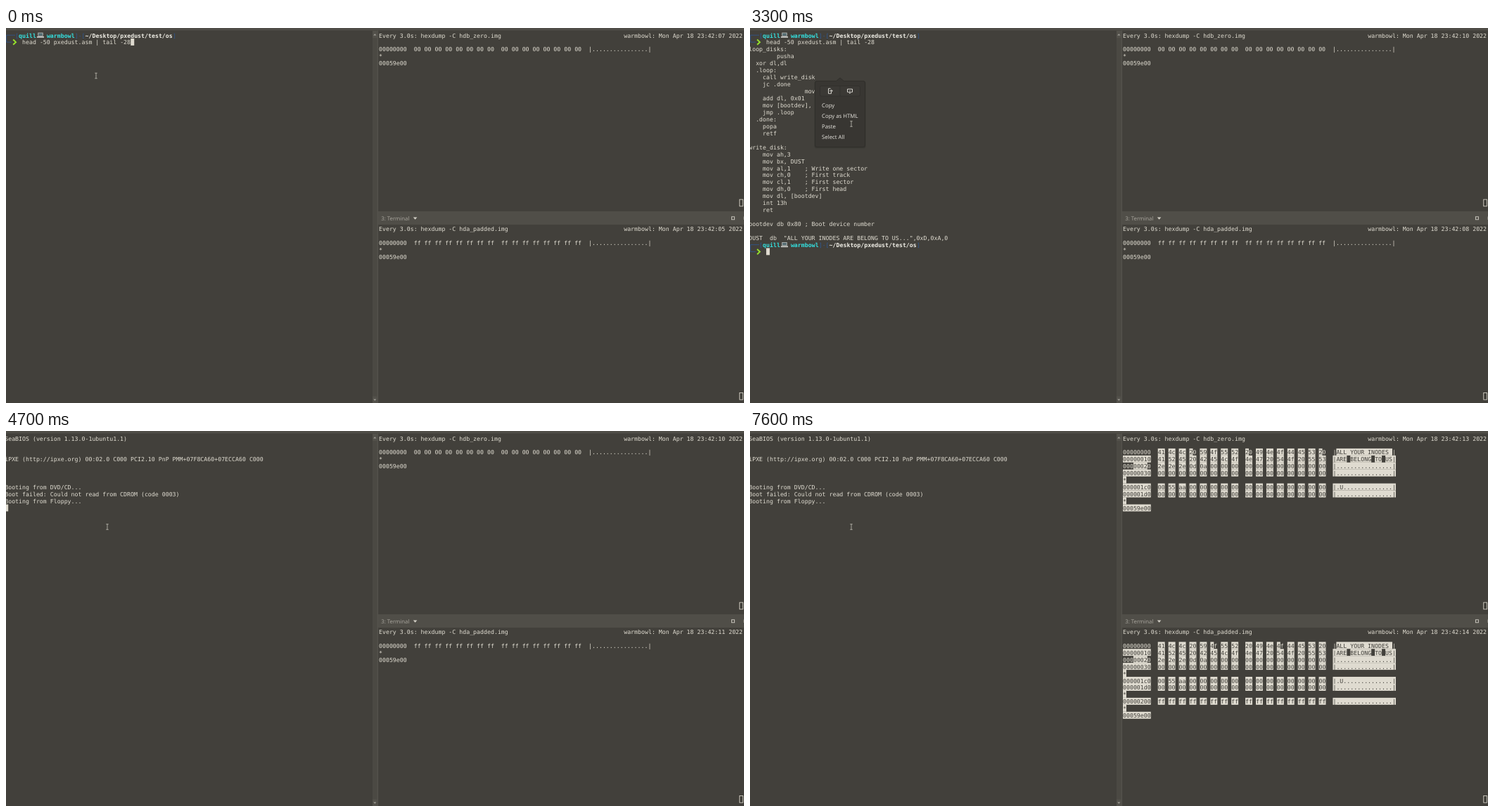
Animation of 1049x534 px, one loop 8 s. Source, as an HTML page:

```html
<!DOCTYPE html>
<html lang="en">
<head>
<meta charset="utf-8">
<title>Terminal session</title>
<style>
  html, body { margin: 0; width: 100%; height: 100%; overflow: hidden; background: #42403b; }
  svg { display: block; width: 100%; height: 100%; }
  text { white-space: pre; text-rendering: geometricPrecision; }
  .mono { font: 8.262px "DejaVu Sans Mono", monospace; fill: #dfdbd0; }
  .bold { font-weight: bold; }
  .ui { font: 7.8px "Open Sans", sans-serif; }
</style>
</head>
<body>
<svg id="stage" viewBox="0 0 1049 534" xmlns="http://www.w3.org/2000/svg"></svg>
<script>
const LOOP = 8000, STEP = 100;
const CELL = 4.974, ROW = 9.948;
const BG = '#42403b', FG = '#dfdbd0', BAR = '#504e48', BLUE = '#2f5793', CYAN = '#34e2e2';
const USER = 'quill', HOST = 'warmbowl';
const LEFT = { x: -1.8, y: 5 }, TOP = { x: 530, y: 5 }, BOTTOM = { x: 530, y: 280.4 };

const LISTING = `loop_disks:
        pusha
  xor dl,dl
  .loop:
    call write_disk
    jc .done
                mov dl, [bootdev]
    add dl, 0x01
    mov [bootdev], dl
    jmp .loop
  .done:
    popa
    retf

write_disk:
    mov ah,3
    mov bx, DUST
    mov al,1    ; Write one sector
    mov ch,0    ; First track
    mov cl,1    ; First sector
    mov dh,0    ; First head
    mov dl, [bootdev]
    int 13h
    ret

bootdev db 0x80 ; Boot device number

DUST  db  "ALL YOUR INODES ARE BELONG TO US...",0xD,0xA,0`.split('\n');

const COMMAND = `       qemu-system-x86_64 \\
>     -fda pxedust.bin \\
>     -boot d \\
>     -hda hda_padded.img \\
>     -hdb hdb_zero.img \\
>     -vga none -nographic`.split('\n');

const WARNINGS = ['pxedust.bin', 'hda_padded.img', 'hdb_zero.img'].flatMap(name => [
  `WARNING: Image format was not specified for '${name}' and probing guessed raw.`,
  '         Automatically detecting the format is dangerous for raw images, write operations on block 0 wil',
  'l be restricted.',
  "         Specify the 'raw' format explicitly to remove the restrictions."
]);

const BIOS = ['SeaBIOS (version 1.13.0-1ubuntu1.1)', '', '',
  'iPXE (http://ipxe.org) 00:02.0 C000 PCI2.10 PnP PMM+07F8CA60+07ECCA60 C000', '', '', '',
  'Booting from DVD/CD...',
  'Boot failed: Could not read from CDROM (code 0003)',
  'Booting from Floppy...'];

const escapeText = s => s.replace(/&/g, '&amp;').replace(/</g, '&lt;').replace(/>/g, '&gt;');
const rect = (x, y, w, h, fill, extra = '') =>
  `<rect x="${x}" y="${y}" width="${w}" height="${h}" fill="${fill}" ${extra}/>`;
const path = (d, stroke, width = 1) =>
  `<path d="${d}" fill="none" stroke="${stroke}" stroke-width="${width}"/>`;
const label = (x, y, s, fill) => `<text class="ui" x="${x}" y="${y}" fill="${fill}">${s}</text>`;

function write(pane, row, col, s, fill = FG, bold = false) {
  if (!s.trim()) return '';
  const x = pane.x + col * CELL, y = pane.y + row * ROW + 8.5;
  return `<text class="mono${bold ? ' bold' : ''}" x="${x}" y="${y}" style="fill:${fill}">${escapeText(s)}</text>`;
}
const writeLines = (pane, row, lines) => lines.map((s, i) => write(pane, row + i, 0, s)).join('');
const block = (pane, row, col, n = 1) =>
  rect(pane.x + col * CELL, pane.y + row * ROW, n * CELL, ROW, FG);
const hollow = (pane, row, col) =>
  rect(pane.x + col * CELL + .4, pane.y + row * ROW + .4, CELL - .3, ROW - .3, 'none', `stroke="${FG}" stroke-width=".8"`);

function prompt(row) {
  const y = LEFT.y + row * ROW, mid = y + 5.2, low = mid + ROW;
  const put = (col, s, fill, bold) => write(LEFT, row, col, s, fill, bold);
  return path(`M13 ${mid}H.7V${low}H8`, BLUE, .8)
    + put(3, '[', BLUE) + put(4, USER, CYAN, true)
    + rect(45.3, y + 1.6, 7.4, 5, '#b9bdbb') + rect(46.2, y + 2.4, 5.6, 3.5, '#536a70')
    + rect(44, y + 7, 10, 1.7, '#d0d2cf')
    + put(12, HOST, CYAN, true) + put(20, ']-[', BLUE)
    + put(23, '~/Desktop/pxedust/test/os', '#f0eee6', true) + put(48, ']', BLUE)
    + path(`M10.2 ${low - 3.6}L14 ${low}L10.2 ${low + 3.6}`, '#97e32c', 1.9);
}

function hexRow(offset, bytes) {
  const hex = bytes.map(b => b.toString(16).padStart(2, '0'));
  const ascii = bytes.map(b => b >= 32 && b < 127 ? String.fromCharCode(b) : '.').join('');
  return `${offset}  ${hex.slice(0, 8).join(' ')}  ${hex.slice(8).join(' ')}  |${ascii}|`;
}
const fill16 = (value, head = []) => Array.from({ length: 16 }, (_, i) => head[i] ?? value);
const codes = s => [...s].map(c => c.charCodeAt(0));
const blankDump = value => [hexRow('00000000', fill16(value)), '*', '00059e00'];
const infectedDump = tail => [
  hexRow('00000000', codes('ALL YOUR INODES ')),
  hexRow('00000010', codes('ARE BELONG TO US')),
  hexRow('00000020', fill16(0, codes('...\r\n'))),
  hexRow('00000030', fill16(0)), '*',
  hexRow('000001c0', fill16(0, [0, 0x55, 0xaa])),
  hexRow('000001d0', fill16(0)), '*', ...tail, '00059e00'];

// Characters that differ from the previous dump are shown in reverse video.
function diffRow(pane, row, now, before) {
  const changed = [...now].map((c, i) => c !== (before[i] ?? ' '));
  let out = '';
  for (let i = 0; i < now.length;) {
    let end = i + 1;
    while (end < now.length && changed[end] === changed[i]) end++;
    if (changed[i]) out += block(pane, row, i, end - i);
    out += write(pane, row, i, now.slice(i, end), changed[i] ? BG : FG);
    i = end;
  }
  return out;
}

function watch(pane, file, second, before, now) {
  return write(pane, 0, 0, `Every 3.0s: hexdump -C ${file}`)
    + write(pane, 0, 70, `${HOST}: Mon Apr 18 23:42:${String(second).padStart(2, '0')} 2022`)
    + now.map((s, i) => diffRow(pane, i + 2, s, before[i] ?? '')).join('')
    + hollow(pane, 24, 103);
}

function rightPanes(t) {
  const zero = blankDump(0), padded = blankDump(255);
  const topDump = t >= 5900 ? infectedDump([]) : zero;
  const bottomDump = t >= 7000 ? infectedDump([hexRow('00000200', fill16(255)), '*']) : padded;
  const topSecond = t < 2900 ? 7 : t < 5900 ? 10 : 13;
  const bottomSecond = t < 1000 ? 5 : t < 4000 ? 8 : t < 7000 ? 11 : 14;
  return watch(TOP, 'hdb_zero.img', topSecond, zero, topDump)
    + watch(BOTTOM, 'hda_padded.img', bottomSecond, padded, bottomDump);
}

function leftPane(t) {
  if (t >= 4700) {
    const on = t < 5200 || Math.floor((t - 5200) / 600) % 2 === 1;
    return writeLines(LEFT, 0, BIOS) + (on ? block(LEFT, 10, 0) : '');
  }
  let out = prompt(0) + write(LEFT, 1, 5, 'head -50 pxedust.asm | tail -28');
  if (t < 400) return out + block(LEFT, 1, 36);
  if (t < 500) return out + block(LEFT, 2, 0);
  out += writeLines(LEFT, 2, LISTING);
  if (t < 600) return out + block(LEFT, 30, 0);
  out += prompt(30);
  if (t < 3400) {
    if (t >= 2100 && t < 3300) return out + hollow(LEFT, 31, 5);
    return out + (t >= 1100 && t < 1700 ? '' : block(LEFT, 31, 5));
  }
  out += writeLines(LEFT, 31, COMMAND);
  if (t < 4600) return out + (t < 3900 || t >= 4500 ? block(LEFT, 36, 26) : '');
  return out + writeLines(LEFT, 37, WARNINGS) + block(LEFT, 49, 0);
}

function menu(t) {
  if (t < 2100 || t >= 3400) return '';
  const hover = t < 2700 || t >= 3200 ? -1 : Math.min(2, (t - 2700) / 100);
  const ink = '#e9e7e1';
  const items = ['Copy', 'Copy as HTML', 'Paste', 'Select All'];
  return rect(91.5, 75.5, 73, 96, '#2d2c28', 'rx="3" opacity=".35"')
    + `<path d="M95 75.5H122.5L128 71L133.5 75.5H161Q163.5 75.5 163.5 78V167Q163.5 169.5 161 169.5H95Q92.5 169.5 92.5 167V78Q92.5 75.5 95 75.5Z" fill="#383632" stroke="#2e2d29" stroke-width=".8"/>`
    + rect(99.5, 82.5, 57, 14.5, '#3b3935', 'rx="2" stroke="#302f2b" stroke-width=".7"')
    + path('M128 82.5V97', '#302f2b', .7)
    + path('M114.5 86.2H111.5V93.3H115.5V91M113 89.5H117M115.2 87.5L117 89.5L115.2 91.5', ink, .9)
    + path('M140 91.2H138.5V87H145.5V91.2H144M142 89V93M140.2 91.4L142 93.2L143.8 91.4', ink, .9)
    + (hover < 0 ? '' : rect(99, 103 + hover * 14.9, 58, 15, '#504e48'))
    + items.map((s, i) => label(102, 113.2 + i * 14.9, s, ink)).join('');
}

function pointer(t) {
  const k = Math.max(0, Math.min(1, (t - 2600) / 300));
  const x = 128 + 16 * k, y = 68 + 68.5 * k;
  return path(`M${x - 1.7} ${y - 3.8}H${x + 1.7}M${x} ${y - 3.8}V${y + 3.8}M${x - 1.7} ${y + 3.8}H${x + 1.7}`, '#c3c0b7', .8);
}

const chrome = rect(0, 0, 1049, 534, BG) + rect(0, 0, 1049, 3.5, BAR)
  + rect(521, 3.5, 6.5, 531, '#4b4943') + rect(527.5, 3.5, 1.5, 531, '#55534d')
  + rect(521, 4, 6.5, 10, '#53514b') + rect(521, 524.5, 6.5, 10, '#53514b')
  + '<path d="M522.2 10.5L524.3 8.3L526.4 10.5ZM522.2 528.5L524.3 530.7L526.4 528.5Z" fill="#a19f97"/>'
  + rect(529, 261, 520, 19, BAR)
  + label(533.2, 273.8, '3: Terminal', '#aaa79f')
  + '<path d="M578.8 269.5H584.4L581.6 272.7Z" fill="#d4d1c8"/>'
  + rect(1031.4, 268.8, 4, 4, 'none', 'stroke="#d4d1c8" stroke-width=".9"')
  + rect(1048.2, 268.5, .8, 4.5, '#8b8880');

const stage = document.getElementById('stage');
let shown = -1;

function render(ms) {
  const t = Math.floor(ms % LOOP / STEP) * STEP;
  if (t === shown) return;
  shown = t;
  stage.innerHTML = chrome + leftPane(t) + rightPanes(t) + menu(t) + pointer(t);
}

const start = performance.now();
function tick() {
  render(performance.now() - start);
  requestAnimationFrame(tick);
}
tick();
</script>
</body>
</html>
```
